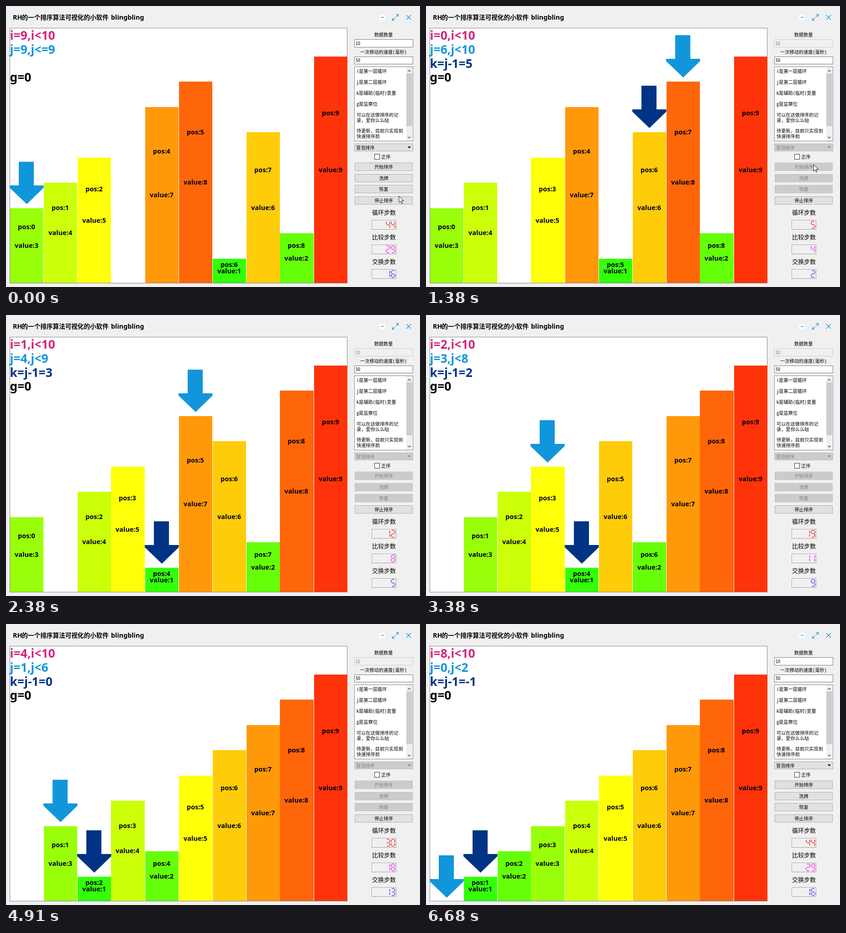
These frames come from a looping animation (907 by 617 pixels, 7140 ms). An HTML page:

```html
<!DOCTYPE html>
<html lang="zh">
<head>
<meta charset="utf-8">
<title>排序</title>
<style>
  html, body { margin: 0; width: 100%; height: 100%; overflow: hidden; background: #f0f0f0; }
  svg { display: block; width: 100vw; height: 100vh; }
  text { white-space: pre; }
  .ui { font: 10.2px 'Noto Sans Mono CJK SC', 'Noto Sans CJK SC', monospace; }
  .big { font: 13px 'Noto Sans CJK SC', sans-serif; }
  .mid { text-anchor: middle; }
  .var { font: bold 26.4px 'Noto Sans', 'Open Sans', sans-serif; }
  .bar { font: bold 14.5px 'Noto Sans', 'Open Sans', sans-serif; text-anchor: middle; }
  .latin { font: bold 14.3px 'Noto Sans', 'Open Sans', sans-serif; }
  .han { font: bold 13.6px 'Noto Sans CJK SC', sans-serif; }
</style>
</head>
<body>
<svg id="stage" viewBox="0 0 907 617" preserveAspectRatio="none"></svg>
<script>
const LOOP = 7140, FRAME = 76.88, LEAD = 9;
const START = 396, UNIT = 49.6;               // sort start, one delay of the sorter
const FIRST = [3, 4, 5, 0, 7, 8, 1, 6, 2, 9], N = FIRST.length;
const BLUE = '#1296db', NAVY = '#003385';

const stage = document.getElementById('stage');
const $ = id => document.getElementById(id);
const set = (id, attrs) => { for (const k in attrs) $(id).setAttribute(k, attrs[k]); };
const say = (id, s) => { if ($(id).textContent !== s) $(id).textContent = s; };

// Bubble sort, kept as a list of timed steps
function plan() {
  const order = [...FIRST], steps = [];
  let at = START, swaps = 0;
  for (let i = 0; i < N - 1; i++) {
    for (let j = 0; j < N - 1 - i; j++) {
      const a = order[j], b = order[j + 1], swap = a > b;
      steps.push({ at, i, j, a, b, swap, swaps, order: [...order] });
      if (swap) { order[j] = b; order[j + 1] = a; swaps++; }
      at += UNIT * (swap ? 4 : 2);
    }
  }
  return { steps, end: at, swaps };
}
const { steps, end, swaps: allSwaps } = plan();

// Geometry
const topOf = v => Math.round(610 - 55.45 * v);
const slotX = p => 9 + 74 * p - (p % 5 === 3 ? 1 : 0);
const slotW = p => p % 5 === 3 ? 74 : 73;
const hue = v => `rgb(${Math.min(255, 51 * v)},${Math.min(255, 51 * (10 - v))},10)`;

// Markup helpers
const box = (x, y, w, h, fill, stroke, id = '') =>
  `<rect id="${id}" x="${x + .5}" y="${y + .5}" width="${w - 1}" height="${h - 1}" fill="${fill}" stroke="${stroke}"/>`;
const text = (x, y, s, cls, fill = '#000', id = '') =>
  `<text id="${id}" x="${x}" y="${y}" class="${cls}" fill="${fill}">${s}</text>`;
const line = (d, stroke, w = 1, id = '') =>
  `<path id="${id}" d="${d}" fill="none" stroke="${stroke}" stroke-width="${w}"/>`;

const buttons = ['开始排序', '洗牌', '恢复', '停止排序'].map((name, n) => ({ name, y: Math.round(344 + 24.7 * n) }));
const meters = [['循环步数', '#f00'], ['比较步数', '#f0f'], ['交换步数', '#22f']];
const notes = [[143, 'i是第一层循环'], [167, 'j是第二层循环'], [191, 'k是辅助(临时)变量'], [215, 'g是监察位'],
  [239, '可以在这做排序的记'], [251, '录，爱你么么哒'], [274, '待更新，目前只实现到'], [286, '快速排序前']];

function bar(v) {
  const y = topOf(v), h = 608 - y;
  if (v === 0) return '<g id="bar0"></g>';
  return `<g id="bar${v}"><rect id="col${v}" y="${y}" width="73" height="${h}" fill="${hue(v)}"/>` +
    text(36, y + h / 4 + 5, '', 'bar', '#000', 'pos' + v) +
    text(36, y + h / 2 + 5, 'value:' + v, 'bar') + '</g>';
}
const arrow = (id, fill) =>
  `<path id="${id}" fill="${fill}" d="M19-102H52V-50H73.5V-45L36.5-9L-1-45V-50H19Z"/>`;

function build() {
  const bars = FIRST.map((_, v) => bar(v)).join('');
  stage.innerHTML = `
    <defs><clipPath id="view"><rect x="8" y="49" width="740" height="559"/></clipPath></defs>
    <rect width="907" height="617" fill="#f0f0f0"/>
    ${text(15, 30, 'RH', 'latin')}${text(34.5, 30, '的一个排序算法可视化的小软件', 'han')}${text(230, 30, 'blingbling', 'latin')}
    <circle cx="824" cy="25" r="7" fill="#fff"/>
    ${line('M821 25H828', BLUE, 1.3)}
    ${line('M854 24L859 19M854.500 18.500H859.500V23.500M852 26L847 31M846.500 26.500V31.500H851.500', BLUE, 1.2)}
    ${line('M877 20L887 30M887 20L877 30', BLUE, 1.2)}
    ${box(8, 48, 740, 561, '#fff', '#828790')}
    <g clip-path="url(#view)">${bars}${arrow('light', BLUE)}${arrow('dark', NAVY)}</g>
    ${text(8.5, 74, '', 'var', '#d4237a', 'i')}
    ${text(8.5, 105, '', 'var', BLUE, 'j')}
    ${text(8.5, 136, '', 'var', NAVY, 'k')}
    ${text(8.5, 166, 'g=0', 'var')}
    ${text(827, 67, '数据数量', 'ui mid')}
    ${box(763, 73, 129, 18, '#fff', '#7a7a7a', 'size')}${text(766, 86, '10', 'ui', '#000', 'sizeText')}
    ${text(827, 104.5, '一次移动的速度(毫秒)', 'ui mid')}
    ${box(763, 111, 129, 17, '#fff', '#7a7a7a')}${text(766, 123, '50', 'ui')}
    ${box(763, 133, 129, 164, '#fff', '#828790')}
    ${notes.map(([y, s]) => text(768, y + 4, s, 'ui')).join('')}
    <rect x="877" y="134" width="13" height="162" fill="#f0f0f0"/>
    <rect x="877" y="148" width="13" height="116" fill="#cdcdcd"/>
    ${line('M880.500 144L883.500 141L886.500 144M880.500 287L883.500 290L886.500 287', '#505050', 1.3)}
    ${box(763, 302, 129, 17, '#e1e1e1', '#adadad', 'combo')}
    ${text(767, 314.5, '冒泡排序', 'ui', '#000', 'comboText')}
    <path id="comboMark" d="M880 308.500H887L883.500 312.500Z"/>
    ${box(807, 325, 12, 12, '#fff', '#333')}${text(822, 335, '正序', 'ui')}
    ${buttons.map((b, n) => box(764, b.y, 127, 18, '#e1e1e1', '#adadad', 'btn' + n) +
      text(827.5, b.y + 13, b.name, 'ui mid', '#000', 'btnText' + n)).join('')}
    ${meters.map(([name, c], n) => {
      const y = 470 + 54 * n;
      return text(828, y - 12, name, 'big mid') + box(801, y, 54, 21, '#f0f0f0', '#a0a0a0') +
        line(`M802.500 ${y + 20}V${y + 1.5}H854`, '#fff') + line('', c, 1.3, 'lcd' + n);
    }).join('')}
    <path id="cursor" d="M0 0V14.500L3.400 11.400L5.800 16.800L8 15.800L5.700 10.600H10.300Z" fill="#fff" stroke="#000" stroke-width=".9"/>`;
}

// Seven segment digits: bits are top, upper right, lower right, bottom, lower left, upper left, middle
const MASKS = [63, 6, 91, 79, 102, 109, 125, 7, 127, 111];
function lcd(value, y) {
  return [...String(value)].reverse().map((d, n) => {
    const l = 844.2 - 11 * n, r = l + 7.4, m = y + 7.5, b = y + 15, e = 1;
    const seg = [`M${l + e} ${y}H${r - e}`, `M${r} ${y + e}V${m - e}`, `M${r} ${m + e}V${b - e}`,
      `M${l + e} ${b}H${r - e}`, `M${l} ${m + e}V${b - e}`, `M${l} ${y + e}V${m - e}`, `M${l + e} ${m}H${r - e}`];
    return seg.filter((_, k) => MASKS[d] >> k & 1).join('');
  }).join('');
}

// Everything that depends on the sorter
function stateAt(t) {
  if (t < START) {
    return { order: FIRST, light: 3, dark: -1, i: 'i=9,i<10', j: 'j=9,j<=9', k: '', counts: [44, 29, 16] };
  }
  const n = steps.filter(s => s.at <= t).length - 1, s = steps[n], prev = steps[n - 1];
  const phase = (t - s.at) / UNIT, slots = s.order.map((_, v) => s.order.indexOf(v));
  if (s.swap && phase >= 2.3) slots[s.a] = s.j + 1;
  if (s.swap && phase >= 3.2) slots[s.b] = s.j;
  const shown = phase >= 1 ? s : prev, done = t >= end ? steps.length : n;
  const swaps = t >= end ? allSwaps : s.swaps;
  return {
    slots, light: shown ? shown.a : 3, dark: shown ? shown.b : -1,
    i: `i=${s.i},i<10`, j: `j=${s.j},j<${N - s.i}`, k: `k=j-1=${s.j - 1}`,
    counts: [Math.max(0, done - 1), done - swaps, swaps]
  };
}

function cursorAt(t) {
  if (t < 380) {
    const p = t / 380;
    return [861 - 12 * p, 417 - 69 * p];
  }
  const p = Math.max(0, (t - 1610) / 640);
  return p < 1 ? [849 + 60 * p, 348 - 14 * p] : [-50, -50];
}

function drawPanel(t, [cx, cy]) {
  const busy = t >= START && t < end, ink = busy ? '#838383' : '#000';
  set('size', busy ? { fill: '#f0f0f0', stroke: '#ccc' } : { fill: '#fff', stroke: '#7a7a7a' });
  set('combo', busy ? { fill: '#ccc', stroke: '#bfbfbf' } : { fill: '#e1e1e1', stroke: '#adadad' });
  for (const id of ['sizeText', 'comboText', 'comboMark']) set(id, { fill: ink });
  buttons.forEach(({ y }, n) => {
    const off = busy && n < 3, hover = !off && cx > 764 && cx < 891 && cy > y && cy < y + 17 && t > 0;
    let fill = off ? '#ccc' : hover ? '#e5f1fb' : '#e1e1e1';
    if (n === 0 && t >= 6675) fill = '#dfdfe4';
    set('btn' + n, { fill, stroke: off ? '#bfbfbf' : hover ? '#0078d7' : '#adadad' });
    set('btnText' + n, { fill: off ? '#838383' : '#000' });
  });
}

function draw(now) {
  const f = Math.floor((now % LOOP + LEAD) / FRAME), t = Math.max(0, f * FRAME - LEAD);
  const st = stateAt(t), slots = st.slots || FIRST.map((_, v) => FIRST.indexOf(v));
  slots.forEach((p, v) => {
    set('bar' + v, { transform: `translate(${slotX(p)} 0)` });
    if (v) {
      set('col' + v, { width: slotW(p) });
      say('pos' + v, 'pos:' + p);
    }
  });
  for (const id of ['light', 'dark']) {
    const v = st[id];
    set(id, { transform: v < 0 ? 'translate(-200 0)' : `translate(${slotX(slots[v])} ${topOf(v)})` });
  }
  for (const id of ['i', 'j', 'k']) say(id, st[id]);
  st.counts.forEach((c, n) => set('lcd' + n, { d: lcd(c, 472.8 + 54 * n) }));
  const cur = cursorAt(t);
  set('cursor', { transform: `translate(${cur[0]} ${cur[1]})` });
  drawPanel(t, cur);
}

build();
const began = performance.now();
function tick() {
  draw(performance.now() - began);
  requestAnimationFrame(tick);
}
tick();
</script>
</body>
</html>
```
